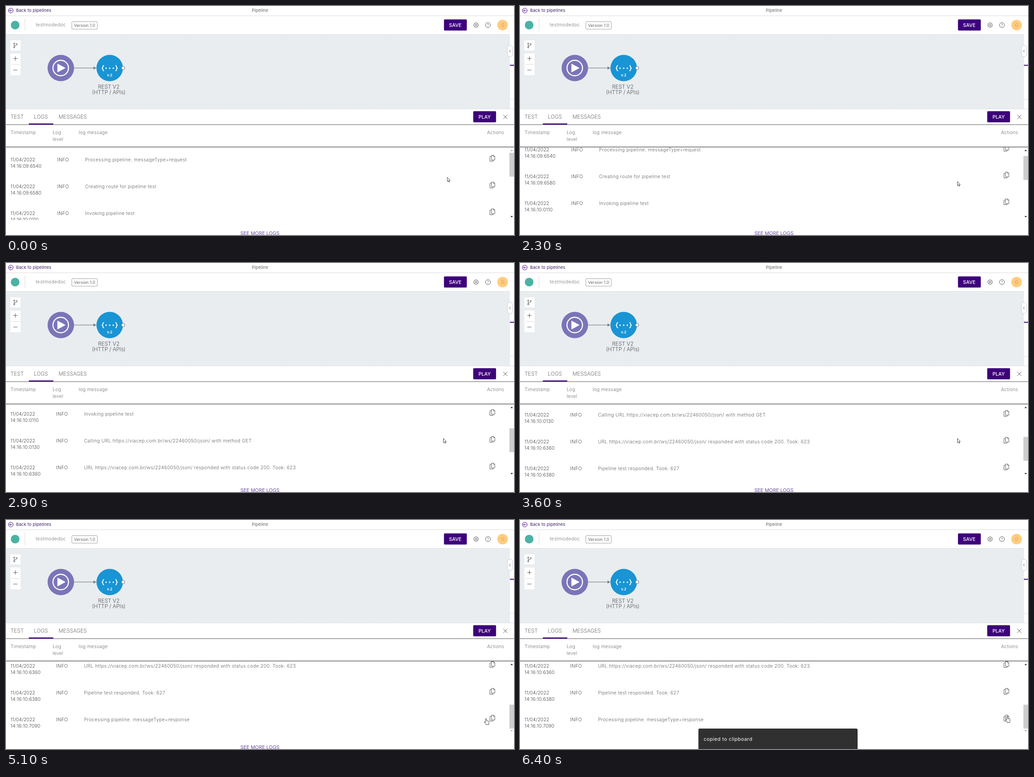
Recreate the animation shown at these times as an HTML page. Size 1112 by 504 pixels, loop 8 s.

```html
<!DOCTYPE html>
<html lang="en">
<head>
<meta charset="utf-8">
<title>Pipeline logs</title>
<style>
html, body { margin: 0; width: 100%; height: 100%; overflow: hidden; background: #fff; }
svg { display: block; width: 1112px; height: 504px; }
text { font-family: Inter, "Open Sans", sans-serif; font-size: 10.2px; fill: #666; white-space: pre; }
.nav { font-size: 9.4px; letter-spacing: .01em; }
.node { font-size: 11.6px; fill: #505050; font-weight: 300; text-anchor: middle; }
.tab { font-size: 11.5px; fill: #6c6c6c; font-weight: 300; }
.btn { font-size: 10.6px; font-weight: 500; fill: #fff; text-anchor: middle; }
.head { letter-spacing: .03em; fill: #707070; font-weight: 300; }
.date { letter-spacing: .01em; fill: #404040; font-weight: 300; }
.level { letter-spacing: .05em; fill: #404040; font-weight: 300; }
.msg { letter-spacing: .04em; fill: #606060; font-weight: 300; }
.line { fill: none; stroke: #5c5c5c; stroke-width: 1; }
.main { fill: #3d007a; }
</style>
</head>
<body>
<svg viewBox="0 0 1112 504">
  <defs>
    <pattern id="dots" width="7.3" height="7.3" patternUnits="userSpaceOnUse">
      <rect x="3" y="3" width="1" height="1" fill="#e2e7ea"/>
    </pattern>
    <clipPath id="view"><rect y="311" width="1101" height="160"/></clipPath>
    <g id="copy" class="line">
      <path d="M-1.8-6.5H2.8L5.5-3.7V4H-1.8ZM2.8-6.5V-3.7H5.5"/>
      <path d="M-1.8-3.8H-5.2V6.5H1.8V4"/>
    </g>
  </defs>
  <rect width="1112" height="504" fill="#fff"/>

  <!-- top bars -->
  <g fill="none" stroke="#3d007a">
    <circle cx="10.5" cy="10" r="5.2"/>
    <path d="M13.3 10H7.8M10 7.7L7.7 10L10 12.3"/>
  </g>
  <text class="nav" x="22" y="13.4" style="fill:#3f2166">Back to pipelines</text>
  <text class="nav" x="538" y="13.4">Pipeline</text>
  <path d="M0 21.5H1112M41.5 28V55" stroke="#dcdcdc"/>
  <circle cx="20" cy="42" r="9.5" fill="#4bb3a4"/>
  <text x="65" y="45.3" style="letter-spacing:.04em;fill:#777;font-weight:300">testmodedoc</text>
  <rect x="144" y="34.5" width="56" height="16.5" rx="2" fill="#fff" stroke="#a0a0a0"/>
  <text x="172" y="46.2" text-anchor="middle" style="font-size:9px">Version 1.0</text>
  <rect class="main" x="958.7" y="29.5" width="50" height="24.5" rx="2"/>
  <text class="btn" x="983.5" y="45.6">SAVE</text>
  <g class="line" transform="translate(1029 42)">
    <path id="gear"/>
    <circle r="1.8"/>
  </g>
  <circle class="line" cx="1055" cy="42" r="5.4"/>
  <text x="1055" y="45" text-anchor="middle" style="font-size:8px">?</text>
  <circle cx="1087" cy="42" r="11.6" fill="#ffcc80"/>
  <text x="1087" y="45.7" text-anchor="middle" style="fill:#e79a3c">G</text>

  <!-- flow canvas -->
  <rect y="62" width="1112" height="165" fill="#e9edf0"/>
  <rect y="62" width="1103" height="165" fill="url(#dots)"/>
  <path d="M0 62.5H1112M0 226.5H1112" stroke="#dde1e4"/>
  <rect x="1103" y="62" width="9" height="164" fill="#fff"/>
  <path d="M1103 205.5H1112" stroke="#e2e2e2"/>
  <rect class="main" x="1103" y="129.5" width="9" height="2"/>
  <rect x="1097.5" y="86.5" width="11.5" height="25" rx="5.7" fill="#fff" stroke="#ccc"/>
  <path class="line" d="M1104.5 96.5L1101.8 99.2L1104.5 102"/>
  <g fill="#fff" stroke="#dde1e4" stroke-width=".6">
    <rect x="9" y="75" width="23.5" height="23.5" rx="1"/>
    <rect x="9" y="104" width="23.5" height="49" rx="1"/>
  </g>
  <path d="M12 128.5H30" stroke="#ddd"/>
  <path class="line" d="M16 115.5H25M20.5 111V120M16 141H25" stroke-width="1.2"/>
  <g class="line">
    <circle cx="18" cy="82.7" r="1.4"/><circle cx="23.5" cy="83.7" r="1.4"/><circle cx="18" cy="91" r="1.4"/>
    <path d="M18 84.2V89.5M23.5 85.2C23.5 88 18 86.5 18 89"/>
  </g>
  <path d="M149 136.5H193" stroke="#949494" stroke-width="1.4"/>
  <path d="M191.5 133L198 136.5L191.5 140Z" fill="#808080"/>
  <circle cx="120" cy="136.5" r="29" fill="#7b74b8"/>
  <circle cx="119.8" cy="136.5" r="17" fill="none" stroke="#fff" stroke-width="2.4"/>
  <path d="M113 127.5V145.5L129.5 136.5Z" fill="#fff" stroke="#fff" stroke-linejoin="round"/>
  <circle cx="227" cy="136.5" r="29" fill="#1994d4"/>
  <g fill="none" stroke="#fff" stroke-width="1.8">
    <path id="brace" d="M214.5 131C210.5 131 213.7 136.8 209.5 136.8C213.7 136.8 210.5 142.6 214.5 142.6"/>
    <use href="#brace" transform="matrix(-1 0 0 1 454 0)"/>
  </g>
  <g fill="#fff">
    <circle cx="219" cy="136.9" r="1.6"/><circle cx="227" cy="136.9" r="1.6"/><circle cx="235" cy="136.9" r="1.6"/>
  </g>
  <text x="227" y="155.4" text-anchor="middle" style="font-size:7.5px;font-weight:700;fill:#fff">v.2</text>
  <circle cx="256.3" cy="136.5" r="3.5" fill="#fff" stroke="#808080" stroke-width="1.2"/>
  <text class="node" x="225" y="182">REST V2</text>
  <text class="node" x="225" y="193.6">(HTTP / APIs)</text>

  <!-- log panel -->
  <text class="tab" x="10" y="248">TEST</text>
  <text class="tab" x="61" y="248">LOGS</text>
  <text class="tab" x="115" y="248">MESSAGES</text>
  <path d="M0 261.2H1112" stroke="#777" stroke-width="1.2"/>
  <rect class="main" x="50" y="258.5" width="53.5" height="2.5"/>
  <rect class="main" x="1022.7" y="231.5" width="50" height="24.5" rx="2"/>
  <text class="btn" x="1047.7" y="247.7">PLAY</text>
  <path class="line" d="M1088.5 239.5L1097.5 248.5M1097.5 239.5L1088.5 248.5" stroke-width="1.2"/>
  <text class="head" x="10" y="282.3">Timestamp</text>
  <text class="head" x="102" y="282.3">Log</text>
  <text class="head" x="102" y="296.6">level</text>
  <text class="head" x="159" y="282.3">log message</text>
  <text class="head" x="1053" y="282.3">Actions</text>
  <g clip-path="url(#view)"><g id="rows"></g></g>
  <path d="M0 310.4H1112" stroke="#444" stroke-width="1.2"/>
  <path id="up" d="M1104.3 319.3L1107 316.3L1109.7 319.3Z"/>
  <path id="down" d="M1104.3 462.3L1107 465.3L1109.7 462.3Z"/>
  <rect id="thumb" x="1102" y="323" width="10" height="52.5" fill="#cdcdcd"/>
  <text x="513" y="504" style="font-size:10.7px;fill:#6a4c9f">SEE MORE LOGS</text>

  <g id="toast">
    <rect x="390.5" y="459" width="348.5" height="50" rx="3" fill="#303030"/>
    <text x="402" y="485.8" style="font-size:10.8px;letter-spacing:.04em;fill:#fff">copied to clipboard</text>
  </g>
  <g id="cursor" fill="#fff" stroke="#333" stroke-width=".9" stroke-linejoin="round">
    <path id="arrow" d="M0 0V9.3L2.1 7.4L3.6 10.7L5 10.1L3.5 6.9H6.3Z"/>
    <path id="hand" d="M-1.2 1C-1.2-.4 .8-.4 .8 1V4.6L5 5.4C6.2 5.7 6.4 6.3 6.3 7.3L5.7 11V13.2H-.6V11.7L-4 8.2C-4.6 7-3.4 6.4-2.6 7.1L-1.2 8.4Z"/>
  </g>
</svg>
<script>
const LOOP = 8000, ROW = 59, MAX = 253;
const $ = id => document.getElementById(id);

const logs = [
  ["09:6540", "Processing pipeline. messageType=request"],
  ["09:6580", "Creating route for pipeline test"],
  ["10:0110", "Invoking pipeline test"],
  ["10:0130", "Calling URL https://viacep.com.br/ws/22460050/json/ with method GET"],
  ["10:6360", "URL https://viacep.com.br/ws/22460050/json/ responded with status code 200. Took: 623"],
  ["10:6380", "Pipeline test responded. Took: 627"],
  ["10:7090", "Processing pipeline. messageType=response"]
];

// [time, value...]: each entry holds until the next one
const scrolls = [
  [0, 0], [2300, 22], [2400, 56], [2500, 73],
  [2700, 78], [2800, 93], [2900, 124], [3000, 151], [3100, 164],
  [3600, 181], [3700, 195], [3800, 208], [3900, 227], [4000, 252.4], [4100, MAX]
];
const moves = [
  [0, 966, 377], [100, 957.6, 386.2], [4500, 959, 388],
  [4700, 966, 392], [4800, 984, 404], [4900, 1010, 420], [5000, 1036, 433],
  [5100, 1051, 437], [5200, 1056, 436], [5300, 1061, 434], [5400, 1064, 433], [5500, 1066.5, 432.3]
];
const toasts = [[0, 50], [6000, 38], [6100, 20], [6200, 8], [6300, 2], [6400, 0]];

const at = (steps, t) => steps.findLast(s => s[0] <= t).slice(1);
const move = (el, x, y) => el.setAttribute("transform", `translate(${x} ${y})`);
const show = (el, on) => el.setAttribute("visibility", on ? "visible" : "hidden");

const text = (cls, x, y, str) => `<text class="${cls}" x="${x}" y="${y}">${str}</text>`;
$("rows").innerHTML = logs.map(([time, msg], i) => {
  const y = 341.8 + i * ROW;
  return text("date", 10, y, "11/04/2022") + text("date", 10, y + 14.6, "14:16:" + time) +
    `<g class="cols">${text("level", 111.8, y, "INFO")}${text("msg", 173, y, msg)}</g>` +
    `<use href="#copy" x="1064.5" y="${y - 6.8}"/>`;
}).join("");
const cols = document.querySelectorAll(".cols");

const teeth = Array.from({ length: 32 }, (_, i) => {
  const a = (i - .5) * Math.PI / 16, r = i % 4 < 2 ? 5.4 : 4.2;
  return `${(r * Math.cos(a)).toFixed(2)} ${(r * Math.sin(a)).toFixed(2)}`;
});
$("gear").setAttribute("d", `M${teeth.join("L")}Z`);

function draw(t) {
  const [top] = at(scrolls, t);
  move($("rows"), 0, -top);
  move($("thumb"), 0, top * .33);
  // the date column narrows once the widest dates are gone
  cols.forEach(c => move(c, top > 100 ? -2.3 : 0, 0));
  $("up").setAttribute("fill", top > 0 ? "#222" : "#a3a3a3");
  $("down").setAttribute("fill", top < MAX ? "#222" : "#a3a3a3");

  move($("cursor"), ...at(moves, t));
  const hover = t >= 5100;
  show($("arrow"), !hover);
  show($("hand"), hover);

  const [drop] = at(toasts, t);
  move($("toast"), 0, drop);
  show($("toast"), t >= 6000);
}

const start = performance.now();
function tick() {
  draw((performance.now() - start) % LOOP);
  requestAnimationFrame(tick);
}
tick();
</script>
</body>
</html>
```
